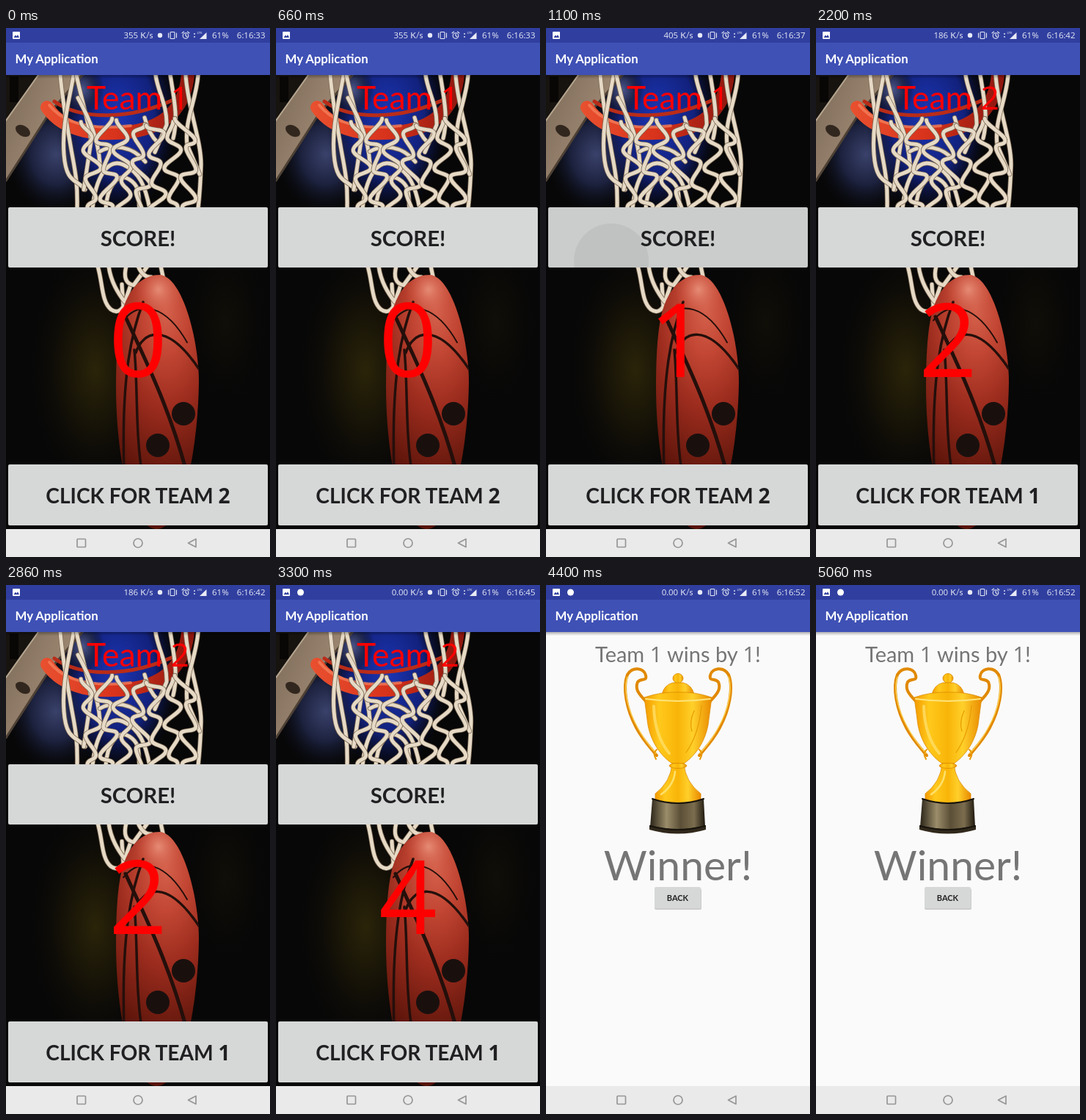
An HTML page for the animation above (5.5 s loop, 360 by 720 pixels).

```html
<!DOCTYPE html>
<html lang="en">
<head>
<meta charset="utf-8">
<title>Score counter</title>
<style>
  html, body { margin: 0; width: 100%; height: 100%; overflow: hidden; background: #fafafa; }
  svg { display: block; width: 100vw; height: 100vh; }
  text { font-family: Lato, "Open Sans", sans-serif; }
  .num { font-family: "Open Sans", "Noto Sans", sans-serif; }
  .mid { text-anchor: middle; }
  .end { text-anchor: end; }
  .bold { font-weight: 700; }
  .line { fill: none; stroke-linecap: round; stroke-linejoin: round; }
</style>
</head>
<body>
<svg viewBox="0 0 360 720" preserveAspectRatio="none">
  <defs>
    <radialGradient id="ballFill" gradientUnits="userSpaceOnUse" cx="218" cy="385" r="240" gradientTransform="translate(218 385) scale(.5 1) translate(-218 -385)">
      <stop offset="0" stop-color="#d4614c"/><stop offset=".25" stop-color="#c24633"/>
      <stop offset=".55" stop-color="#9c2c1e"/><stop offset="1" stop-color="#581309"/>
    </radialGradient>
    <radialGradient id="ballLight">
      <stop offset="0" stop-color="#ed9a84"/><stop offset="1" stop-color="#d4614c" stop-opacity="0"/>
    </radialGradient>
    <radialGradient id="blueGlow">
      <stop offset="0" stop-color="#1c35b4"/><stop offset=".6" stop-color="#12217c"/>
      <stop offset="1" stop-color="#060a24" stop-opacity="0"/>
    </radialGradient>
    <radialGradient id="haze">
      <stop offset="0" stop-color="#4b558c"/><stop offset=".5" stop-color="#232a50"/>
      <stop offset="1" stop-color="#0a0c18" stop-opacity="0"/>
    </radialGradient>
    <radialGradient id="oliveGlow">
      <stop offset="0" stop-color="#2a2409"/><stop offset=".45" stop-color="#171307"/>
      <stop offset="1" stop-color="#0a0908" stop-opacity="0"/>
    </radialGradient>
    <linearGradient id="rimFill" gradientUnits="userSpaceOnUse" x1="50" x2="250">
      <stop offset="0" stop-color="#e8502f"/><stop offset=".5" stop-color="#d8331c"/>
      <stop offset="1" stop-color="#8e170f"/>
    </linearGradient>
    <linearGradient id="armFill" x1="0" y1="0" x2="1" y2=".6">
      <stop offset="0" stop-color="#7c6a58"/><stop offset=".65" stop-color="#9a8570"/>
      <stop offset="1" stop-color="#6d5d4d"/>
    </linearGradient>
    <linearGradient id="gold">
      <stop offset="0" stop-color="#f39a00"/><stop offset=".22" stop-color="#ffc91c"/>
      <stop offset=".5" stop-color="#f9b408"/><stop offset=".72" stop-color="#ffd02a"/>
      <stop offset="1" stop-color="#e98a00"/>
    </linearGradient>
    <linearGradient id="bronze">
      <stop offset="0" stop-color="#2b2418"/><stop offset=".3" stop-color="#9b8d6a"/>
      <stop offset=".55" stop-color="#5b4f37"/><stop offset=".8" stop-color="#7b6d4e"/>
      <stop offset="1" stop-color="#1f190f"/>
    </linearGradient>
    <linearGradient id="barShade" x2="0" y2="1">
      <stop offset="0" stop-opacity=".3"/><stop offset="1" stop-opacity="0"/>
    </linearGradient>
    <clipPath id="stageClip"><rect y="64" width="360" height="618"/></clipPath>
    <clipPath id="ballClip"><use href="#ballShape"/></clipPath>
    <clipPath id="scoreClip"><rect x="3" y="244" width="354" height="82" rx="2"/></clipPath>
  </defs>

  <g id="game" clip-path="url(#stageClip)">
    <rect y="64" width="360" height="618" fill="#070707"/>
    <ellipse cx="68" cy="172" rx="68" ry="82" fill="url(#haze)" opacity=".75"/>
    <ellipse cx="152" cy="120" rx="84" ry="135" fill="url(#blueGlow)"/>
    <ellipse cx="104" cy="84" rx="30" ry="38" fill="url(#haze)"/>
    <ellipse cx="122" cy="465" rx="92" ry="170" fill="url(#oliveGlow)"/>
    <ellipse cx="300" cy="400" rx="60" ry="120" fill="url(#oliveGlow)" opacity=".25"/>

    <path d="M0 64H44L18 108 0 126Z" fill="#17130f"/>
    <path d="M5 66H17V101H5Z" fill="#080706"/>
    <path d="M44 64H106L60 116 0 209V126Z" fill="url(#armFill)"/>
    <path d="M44 64 0 126" class="line" stroke="#b5a690" stroke-width="2"/>
    <path d="M104 64 59 116 0 208" class="line" stroke="#4d4034" stroke-width="3"/>
    <ellipse cx="23" cy="140" rx="11" ry="7" transform="rotate(32 23 140)" fill="#32271e"/>

    <path d="M66 100C100 124 168 128 236 94" class="line" stroke="#b92c18" stroke-width="5"/>
    <path d="M56 108C80 143 128 147 172 141C218 134 244 108 248 64" class="line" stroke="url(#rimFill)" stroke-width="18"/>
    <path d="M59 105C82 134 126 138 170 133" class="line" stroke="#f4805c" stroke-width="4" opacity=".75"/>
    <g id="net" class="line"></g>

    <path id="ballShape" d="M159 384C170 348 190 336 210 336C241 339 263 425 263 482C262 570 242 682 205 682C170 680 150 585 150 487C150 440 153 405 159 384Z" fill="url(#ballFill)"/>
    <g clip-path="url(#ballClip)">
      <ellipse cx="208" cy="356" rx="32" ry="36" fill="url(#ballLight)" opacity=".8"/>
      <g class="line" stroke="#240f0b" stroke-width="3.5">
        <path d="M163 393C181 434 219 505 245 600" stroke-width="5"/>
        <path d="M187 373C172 412 157 470 161 602"/>
        <path d="M177 442C186 414 218 397 263 464"/>
        <path d="M175 438C180 488 176 550 186 610"/>
        <path d="M160 398C183 370 218 377 247 428" stroke-width="2"/>
      </g>
      <circle cx="242" cy="525" r="16" fill="#19100e"/>
      <circle cx="207" cy="568" r="16" fill="#19100e"/>
    </g>

    <text id="team" class="mid" x="180" y="111" font-size="44.5" fill="#f00"></text>
    <text id="score" class="mid num" x="180" y="475" font-size="139" fill="#f00"></text>

    <rect id="scoreButton" x="3" y="244" width="354" height="82" rx="2"/>
    <circle id="ripple" cx="89" cy="317" r="51" fill="#c0c1c1" clip-path="url(#scoreClip)"/>
    <rect x="3" y="594" width="354" height="83" rx="2" fill="#d6d7d7"/>
    <g class="bold mid" fill="#202022">
      <text x="180" y="297" font-size="29.3">SCORE!</text>
      <text id="swap" x="180" y="647" font-size="28.2"></text>
    </g>
  </g>

  <g id="result">
    <rect y="64" width="360" height="618" fill="#fafafa"/>
    <text id="verdict" class="mid" x="180" y="105" font-size="29" fill="#757575"></text>
    <g id="trophy">
      <g id="handle" class="line">
        <path d="M136 158C126 148 121 141 125 132C130 126 138 132 136 123C134 113 118 110 111 122C104 140 110 170 123 194C132 211 142 221 151 232" stroke="#e18900" stroke-width="4"/>
        <path d="M111 125C105 143 112 171 125 194C133 210 142 220 150 229" stroke="#ffd65a" stroke-width="1.3"/>
        <path d="M151 224Q145 229 150 237" stroke="#e99800" stroke-width="2"/>
      </g>
      <use href="#handle" transform="matrix(-1 0 0 1 360 0)"/>
      <g fill="url(#gold)" stroke="#dc8b00" stroke-width=".8">
        <ellipse cx="180" cy="127" rx="7" ry="6.5"/>
        <path d="M158 149Q161 136 173 133H187Q199 136 202 149Z"/>
        <path d="M134 153Q158 145 180 146Q203 145 226 153L222 183C220 207 207 230 188 243H172C153 230 140 207 138 183Z"/>
        <path d="M172 243H188Q190 268 211 284V293Q180 302 149 293V284Q170 268 172 243Z"/>
        <ellipse cx="180" cy="246" rx="12" ry="3.5"/>
      </g>
      <path d="M136 155Q180 161 224 155" class="line" stroke="#ffe47a" stroke-width="2"/>
      <path d="M147 165Q148 205 168 229" class="line" stroke="#ffe16b" stroke-width="4" opacity=".75"/>
      <path d="M212 164Q209 202 191 228M202 171Q195 187 199 199" class="line" stroke="#e79b00" stroke-width="1.2"/>
      <path d="M176 254Q174 273 157 285" class="line" stroke="#ffe16b" stroke-width="2.5"/>
      <path d="M145 291Q180 303 215 291L217 329Q180 343 142 329Z" fill="url(#bronze)"/>
      <path d="M141 327Q180 337 218 327V333Q180 344 141 333Z" fill="#30281b"/>
      <path d="M145 291Q180 303 215 291M142 328Q180 338 217 328" class="line" stroke="#17130c" stroke-width="2"/>
    </g>
    <text class="mid" x="180" y="402" font-size="57" fill="#757575">Winner!</text>
    <rect x="148" y="413" width="64" height="29" rx="2" opacity=".18"/>
    <rect x="148" y="411" width="63" height="29" rx="2" fill="#d6d7d7"/>
    <text class="mid bold" x="179.5" y="430" font-size="11" fill="#222">BACK</text>
  </g>

  <rect y="64" width="360" height="5" fill="url(#barShade)"/>
  <rect width="360" height="20" fill="#303f9f"/>
  <rect y="20" width="360" height="44" fill="#3f51b5"/>
  <text class="bold" x="12.5" y="48" font-size="16.8" fill="#fff">My Application</text>
  <g fill="#e8eaf6" font-size="11.5">
    <rect x="9" y="5" width="10" height="10" rx="1" fill="#fff"/>
    <path d="M10.5 13 13 9.5 14.5 11.5 16 9 18 13Z" fill="#303f9f"/>
    <circle id="badge" cx="33.5" cy="10" r="4.5" fill="#fff"/>
    <text id="rate" class="end" x="200.5" y="14"></text>
    <circle cx="210" cy="10" r="3.2"/>
    <g class="line" stroke="#e8eaf6" stroke-width="1.1">
      <rect x="224" y="5.5" width="6" height="9" rx="1"/>
      <path d="M221.5 7V13M232.5 7V13"/>
      <circle cx="245" cy="10.5" r="3.8"/>
      <path d="M245 8V10.5L247 12M240 7 242.5 5M250 7 247.5 5"/>
    </g>
    <circle cx="257" cy="8" r=".9"/><circle cx="257" cy="12" r=".9"/>
    <path d="M264 15 273.5 6V15Z"/>
    <text x="260.5" y="8" font-size="4.5">LTE</text>
    <text class="num" x="281" y="14">61%</text>
    <text id="clock" class="end" x="353.5" y="14"></text>
  </g>

  <rect y="682" width="360" height="38" fill="#eaeaea"/>
  <g class="line" stroke="#969696" stroke-width="1.7">
    <rect x="97" y="695.5" width="11.5" height="11" rx="1"/>
    <circle cx="180" cy="701" r="6"/>
    <path d="M259 695.5V706.5L248.5 701Z"/>
  </g>
</svg>
<script>
const STEP = 1100;
const states = [
  { team: 1, score: 0, rate: "355", clock: "33" },
  { team: 1, score: 1, rate: "405", clock: "37", pressed: true },
  { team: 2, score: 2, rate: "186", clock: "42" },
  { team: 2, score: 4, rate: "0.00", clock: "45", badge: true },
  { rate: "0.00", clock: "52", badge: true, verdict: "Team 1 wins by 1!" }
];
const el = id => document.getElementById(id);
const show = (id, on) => el(id).style.display = on ? "" : "none";
const write = (id, s) =>
  el(id).innerHTML = String(s).replace(/\d/g, '<tspan class="num">$&</tspan>');

// Wavy cords that nearly meet their neighbours form an uneven mesh.
function meshCord(i, count) {
  const point = row => {
    const y = 128 + row * 20 + Math.sin(i * 5 + row * 3) * 5;
    const left = 100 + row * 1.5, right = 254 + Math.sin(row / 2) * 9;
    const sway = ((row + i) % 2 ? 0.4 : -0.4) + Math.sin(i * 7 + row * 11) * 0.2;
    return [left + (right - left) * (i + 0.5 + sway) / count, y];
  };
  let [x, y] = point(0), d = `M${x} ${y}`;
  for (let row = 1; row < 7; row++) {
    const [nx, ny] = point(row);
    d += `C${x} ${y + 8} ${nx} ${ny - 8} ${nx} ${ny}`;
    [x, y] = [nx, ny];
  }
  return d;
}

function drawNet() {
  const cords = [
    "M74 64C77 100 83 130 88 160S98 205 97 246",
    "M92 64C86 101 76 132 79 172S96 205 108 220",
    "M96 64C102 93 112 125 116 154L106 220",
    "M98 95C115 126 126 153 128 184",
    "M204 64C207 87 220 105 219 132L203 169",
    "M224 64C229 96 235 121 228 150",
    "M245 64C248 110 266 151 266 186Q265 218 262 246",
    "M262 64C259 101 243 125 247 159L264 199",
    "M189 122Q195 145 207 156",
    "M118 246C122 205 138 176 160 186S190 215 196 246",
    "M136 246C138 216 152 196 168 206S180 228 182 246",
    "M128 168C146 158 172 160 190 182",
    "M125 324C132 347 130 372 143 383Q153 390 160 379L158 349",
    "M140 324C143 346 153 361 162 373L170 350",
    "M164 324Q158 347 174 350L193 324",
    "M180 324Q187 340 198 339",
    "M211 324 214 338"
  ];
  const count = 7;
  for (let i = 0; i < count; i++) cords.push(meshCord(i, count));
  el("net").innerHTML = cords.map(d =>
    `<path d="${d}" stroke="#7d6a55" stroke-width="6.4"/>` +
    `<path d="${d}" stroke="#e6dac6" stroke-width="4.8"/>`).join("");
}

let current = -1;
function render(time) {
  const index = Math.floor(time / STEP) % states.length;
  if (index === current) return;
  current = index;
  const s = states[index];
  show("game", !s.verdict);
  show("result", s.verdict);
  show("badge", s.badge);
  show("ripple", s.pressed);
  el("scoreButton").setAttribute("fill", s.pressed ? "#cbcccc" : "#d6d7d7");
  write("rate", s.rate + " K/s");
  write("clock", "6:16:" + s.clock);
  if (s.verdict) {
    write("verdict", s.verdict);
  } else {
    write("team", "Team " + s.team);
    write("score", s.score);
    write("swap", "CLICK FOR TEAM " + (3 - s.team));
  }
}

drawNet();
const start = performance.now();
function tick() {
  render(performance.now() - start);
  requestAnimationFrame(tick);
}
tick();
</script>
</body>
</html>
```
